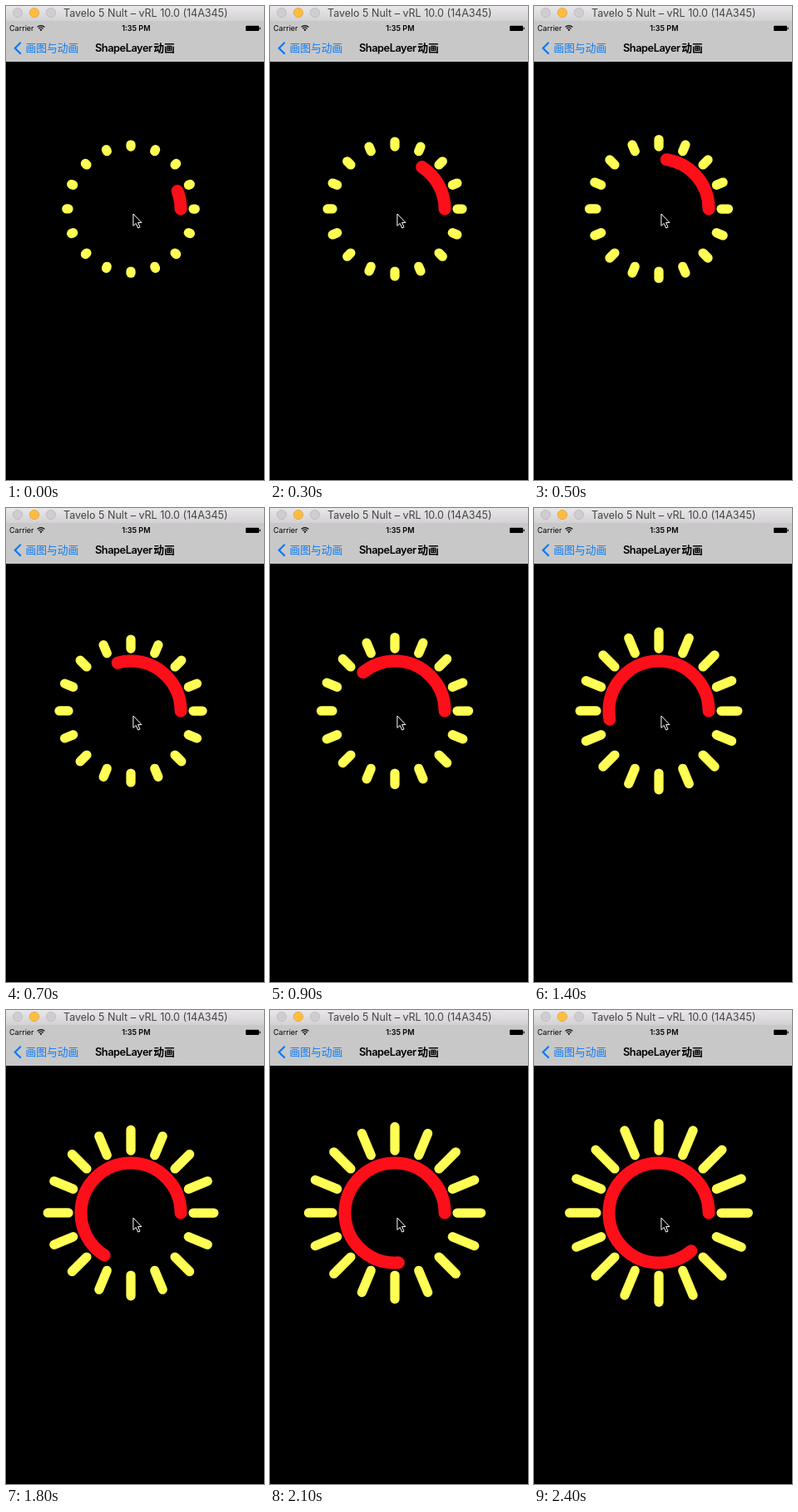
An HTML page with a canvas that plays this animation: 310x570 px, repeating every 2500 ms.

```html
<!DOCTYPE html>
<html lang="zh-CN">
<head>
<meta charset="utf-8">
<title>ShapeLayer动画</title>
<style>
  html, body { margin: 0; width: 310px; height: 570px; overflow: hidden; background: #000; }
  canvas, svg { position: absolute; left: 0; top: 0; display: block; }
  text { font-family: Inter, "Noto Sans CJK SC", "Noto Sans CJK", sans-serif; white-space: pre; }
  .window { font-size: 12.5px; fill: #444; }
  .status { font-size: 9px; fill: #000; }
  .nav { font-size: 12.75px; }
</style>
</head>
<body>
<canvas id="stage" width="310" height="570"></canvas>
<svg width="310" height="570" viewBox="0 0 310 570">
  <defs>
    <linearGradient id="bar" x2="0" y2="1">
      <stop offset="0" stop-color="#e9e7e9"/>
      <stop offset="1" stop-color="#d3d1d3"/>
    </linearGradient>
  </defs>

  <!-- window title bar -->
  <rect width="310" height="18" fill="url(#bar)"/>
  <g stroke-width=".8">
    <circle cx="14" cy="8" r="5.6" fill="#cfcdcf" stroke="#bab8ba"/>
    <circle cx="34" cy="8" r="5.6" fill="#fdbd40" stroke="#e0a234"/>
    <circle cx="54" cy="8" r="5.6" fill="#cfcdcf" stroke="#bab8ba"/>
  </g>
  <text class="window" x="69" y="13">Tavelo 5 Nult – vRL 10.0 (14A345)</text>

  <!-- status bar -->
  <rect y="18" width="310" height="49" fill="#c8c8c8"/>
  <text class="status" x="4" y="30">Carrier</text>
  <g fill="none" stroke="#000" stroke-width="1.3">
    <path d="M37.6 25.4a6.2 6.2 0 0 1 8.8 0"/>
    <path d="M39.4 27.2a3.7 3.7 0 0 1 5.2 0"/>
  </g>
  <path d="M42 30.2l-1.5 -1.6a2.1 2.1 0 0 1 3 0z"/>
  <text class="status" x="156.3" y="30" text-anchor="middle" font-weight="600">1:35 PM</text>
  <rect x="288" y="23.7" width="16" height="6.4" rx="1"/>
  <rect x="304.5" y="25.5" width="1.2" height="2.8" rx=".5"/>

  <!-- navigation bar -->
  <path d="M17.8 43.8L10.8 50.7L17.8 57.6" fill="none" stroke="#0a7cf8" stroke-width="2.2"/>
  <text class="nav" x="23.5" y="55.2" fill="#0a7cf8">画图与动画</text>
  <text class="nav" x="107" y="55.2" font-weight="600"><tspan letter-spacing="-.45">ShapeLayer</tspan><tspan x="177.3">动画</tspan></text>

  <!-- pointer -->
  <path d="M152.9 250V264.4L156.2 261.4L158.7 267L161 266L158.6 260.5H162.9Z" fill="#000" stroke="#fff" stroke-width="1"/>
</svg>
<script>
  const ctx = document.getElementById('stage').getContext('2d');
  const LOOP = 2500, STEP = 100;
  const CX = 150, CY = 244;
  const RING = 60, RAY_START = 75, RAY_GROWTH = 37.5, RAYS = 16;

  function draw(time) {
    const tick = Math.floor((time % LOOP) / STEP);
    const progress = (20.9 + 12.06 * tick) / 360;

    ctx.fillStyle = '#000';
    ctx.fillRect(0, 0, 310, 570);
    ctx.save();
    ctx.translate(CX, CY);
    ctx.lineCap = 'round';

    ctx.strokeStyle = '#fd0f1a';
    ctx.lineWidth = 15;
    ctx.beginPath();
    ctx.arc(0, 0, RING, 0, -progress * 2 * Math.PI, true);
    ctx.stroke();

    ctx.strokeStyle = '#fffe54';
    ctx.lineWidth = 11.25;
    for (let i = 0; i < RAYS; i++) {
      ctx.beginPath();
      ctx.moveTo(RAY_START, 0);
      ctx.lineTo(RAY_START + RAY_GROWTH * progress, 0);
      ctx.stroke();
      ctx.rotate(2 * Math.PI / RAYS);
    }
    ctx.restore();
  }

  const start = performance.now();
  function loop() {
    draw(performance.now() - start);
    requestAnimationFrame(loop);
  }
  loop();
</script>
</body>
</html>
```
